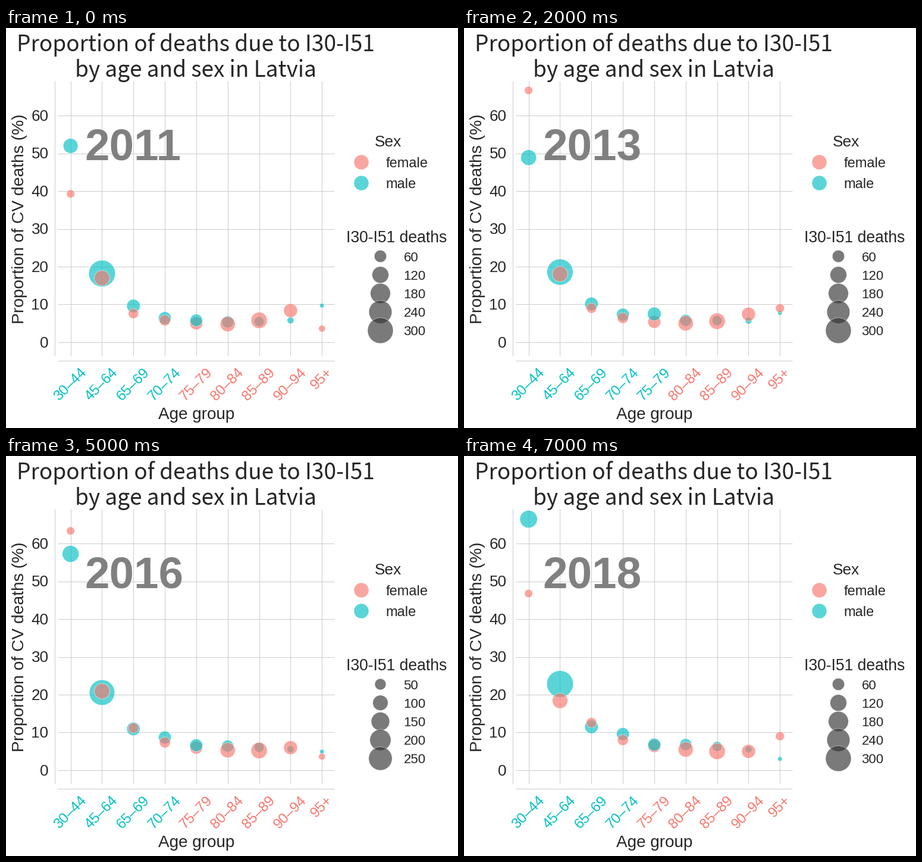
Animation of 760 by 672 pixels, one loop 8 s. Source, as a matplotlib script:

```python
import matplotlib.pyplot as plt
import numpy as np
from matplotlib.animation import FuncAnimation

W, H, DPI = 760, 672, 64
PT = 72 / DPI  # points per pixel
INK, GRID = "#262626", "#cccccc"
MALE, FEMALE = "#00bfc4", "#f8766d"
ALPHA, EDGE = 0.65, 0.7
AGES = ["30–44", "45–64", "65–69", "70–74", "75–79",
        "80–84", "85–89", "90–94", "95+"]
FIRST_YEAR, YEARS = 2011, 8
T = np.arange(YEARS)


def wave(peak, period):
    return np.cos(2 * np.pi * (T - peak) / period)


def track(*keys):
    return np.interp(T, *zip(*keys))


def drift(start, end):
    """Linear change from the first to the last year, one column per age."""
    return np.linspace(start, end, YEARS)


# Share of deaths in %, indexed by year, sex (male, female) and age
share = np.empty((YEARS, 2, len(AGES)))
share[:, 0, 0] = track((0, 52), (2, 48.9), (3, 56.8), (5, 57.3),
                       (6, 64.2), (7, 66.5))
share[:, 1, 0] = track((0, 39.3), (2, 66.7), (3, 58.5), (5, 63.4),
                       (6, 57.5), (7, 46.8))
share[:, 0, 1] = 18.2 + 0.095 * T ** 2
share[:, 1, 1] = track((0, 17), (3, 18.6), (6, 22.1), (7, 18.4))
share[:, 0, 2:] = drift([9.6, 6.4, 6.4, 5.4, 5.5, 5.8, 9.7],
                        [11.5, 9.6, 7, 6.8, 6.3, 5.5, 3])
share[:, 1, 2:] = drift([7.6, 5.8, 5, 4.8, 5.8, 8.4, 6.6],
                        [12.6, 8, 6.4, 5.5, 5, 5, 6.6])
share[:, 0, 4] += 1.2 * wave(2.4, 3.6)
share[:, 1, 8] += 3 * wave(2.5, 5)

# Bubble radius in pixels: a steady profile with a few swings
PROFILE = [[12.2, 21.5, 11, 10.4, 10.5, 9.7, 8, 5.4, 3.6],
           [6.6, 12.7, 8.3, 8.9, 10.5, 12.4, 13.4, 11.3, 6.4]]
radius = np.tile(PROFILE, (YEARS, 1, 1))
radius[:, 0, 0] += 0.32 * T
radius[:, 0, 1] -= 0.6 * wave(4, 7)
radius[:, 0, 4] += 0.8 * wave(2.4, 3.6)
radius[:, 1, 8] += wave(2.5, 5)

# Females lie on top, except in the 75–79 group
ORDER = [(sex, age) for age in range(len(AGES))
         for sex in ((1, 0) if age == 4 else (0, 1))]
SEX, AGE = np.array(ORDER).T


def px_x(i):
    return 108.6 + 52.83 * i


def px_y(v):
    return 527.9 - 6.343 * v


def area(r):
    return (2 * (np.asarray(r) + 0.2) * PT) ** 2


def count_radius(n):
    return np.sqrt(11.5 + 1.475 * np.asarray(n))


fig = plt.figure(figsize=(W / DPI, H / DPI), dpi=DPI, facecolor="white")
ax = fig.add_axes([0, 0, 1, 1])
ax.set_xlim(0, W)
ax.set_ylim(H, 0)
ax.axis("off")


def text(x, y, s, size, **kw):
    style = dict(family="Liberation Sans", color=INK, va="baseline")
    return ax.text(x, y, s, fontsize=size * PT, **{**style, **kw})


def line(x0, y0, x1, y1):
    ax.plot([x0, x1], [y0, y1], color=GRID, lw=PT, zorder=1,
            solid_capstyle="butt")


def bubbles(x, y, r, color):
    return ax.scatter(x, y, s=area(r), c=color, alpha=ALPHA,
                      edgecolors="white", linewidths=EDGE * PT, zorder=3)


# Title and axes
for y, s in ((39, "Proportion of deaths due to I30-I51"),
             (82, "by age and sex in Latvia")):
    text(318.5, y, s, 37, ha="center", family="Noto Sans CJK JP")

for v in range(0, 70, 10):
    line(87, px_y(v), 552, px_y(v))
    text(71.5, px_y(v) + 8.7, str(v), 26, ha="right")
ticks = []
for i, age in enumerate(AGES):
    line(px_x(i), 89, px_x(i), 551)
    ticks.append(text(px_x(i), 567.5, age, 24, ha="center", va="top",
                      rotation=45))
line(81.5, 89, 81.5, 551)
line(87, 559, 552, 559)

text(320, 657, "Age group", 27.9, ha="center")
text(30, 320.5, "Proportion of CV deaths (%)", 28.2, ha="center",
     rotation=90, rotation_mode="anchor")
year_text = text(132, 221, "", 74.6, weight="bold", color="#808080",
                 zorder=2)

# Sex legend
text(642, 199, "Sex", 26.3, ha="center")
bubbles([597.5] * 2, [225.5, 260.5], [12.3] * 2, [FEMALE, MALE])
text(638.4, 234, "female", 23.6)
text(638.4, 269, "male", 23.6)

# Size legend
text(656.5, 360, "I30-I51 deaths", 26.5, ha="center")
rows = 383.5 + 31.2 * np.arange(5)
keys = bubbles([629.5] * 5, rows, np.ones(5), ["#333333"] * 5)
key_texts = [text(668.4, y + 8, "", 22.3) for y in rows]

points = bubbles(px_x(AGE), px_y(share[0, SEX, AGE]), radius[0, SEX, AGE],
                 [(MALE, FEMALE)[s] for s in SEX])


def update(k):
    year_text.set_text(str(FIRST_YEAR + k))
    points.set_offsets(np.c_[px_x(AGE), px_y(share[k, SEX, AGE])])
    points.set_sizes(area(radius[k, SEX, AGE]))

    # Age labels take the colour of the sex with more deaths
    for tick, m, f in zip(ticks, *radius[k]):
        tick.set_color(MALE if m > f else FEMALE)

    step = 60 if radius[k].max() > count_radius(300) else 50
    counts = step * np.arange(1, 6)
    keys.set_sizes(area(count_radius(counts)))
    for label, n in zip(key_texts, counts):
        label.set_text(str(n))
    return [year_text, points, keys, *ticks, *key_texts]


anim = FuncAnimation(fig, update, frames=YEARS, interval=1000,
                     repeat=True, repeat_delay=0)
plt.show()
```
